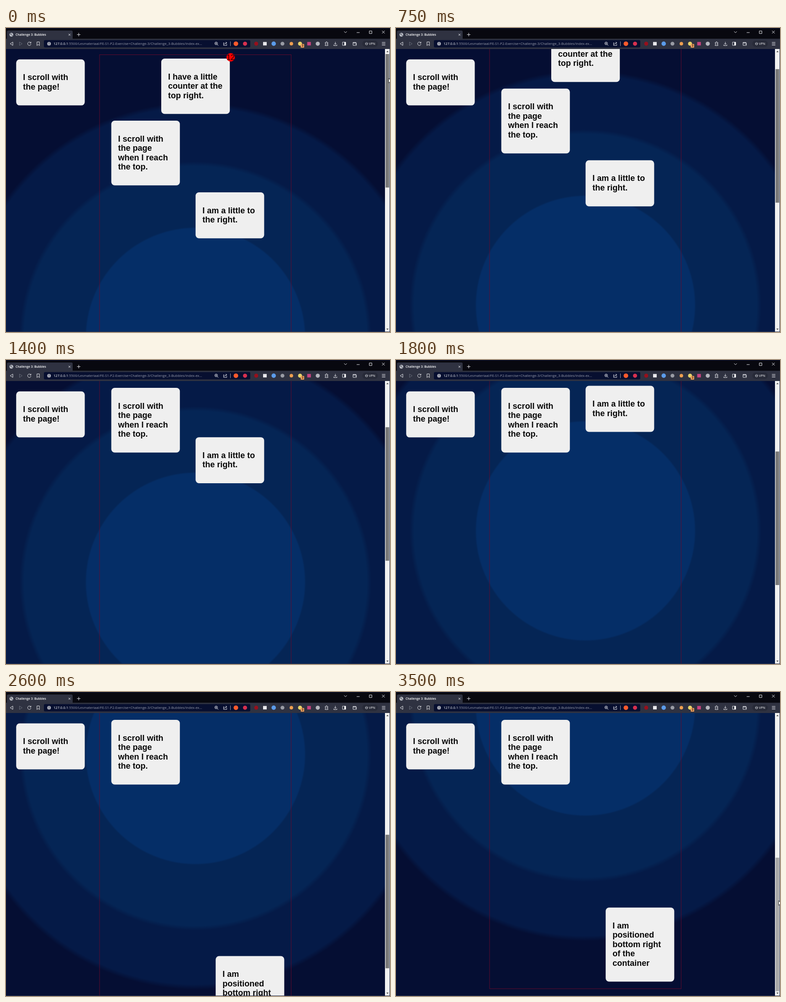
An HTML page that plays this animation: 841 by 666 pixels, repeating every 3.7 s.

```html
<!DOCTYPE html>
<html lang="en">
<head>
<meta charset="utf-8">
<title>Challenge 3: Bubbles</title>
<style>
  html, body { margin: 0; width: 100%; height: 100%; overflow: hidden; background: #050e33; }
  svg { display: block; width: 841px; height: 666px; }
  .card rect { fill: #efefef; }
  .card text { font: bold 18px "Liberation Sans", Arial, sans-serif; fill: #080808; }
  .badge { font: 16px "Liberation Sans", Arial, sans-serif; fill: #1c0000; text-anchor: middle; }
  .ui { font-family: "Open Sans", "Noto Sans", sans-serif; fill: #fff; }
  .line { fill: none; stroke: #e4e5ea; stroke-width: 1; }
</style>
</head>
<body>
<svg viewBox="0 0 841 666" xmlns="http://www.w3.org/2000/svg">
  <defs>
    <clipPath id="view"><rect y="46" width="830" height="619"/></clipPath>
    <radialGradient id="rings" gradientUnits="userSpaceOnUse" cx="415" cy="677.7" r="520">
      <stop offset=".458" stop-color="#052e67"/>
      <stop offset=".465" stop-color="#052555"/>
      <stop offset=".721" stop-color="#052555"/>
      <stop offset=".741" stop-color="#051a47"/>
      <stop offset=".968" stop-color="#051a47"/>
      <stop offset=".990" stop-color="#050e33"/>
    </radialGradient>
  </defs>

  <g clip-path="url(#view)">
    <g id="page">
      <rect y="46" width="830" height="1268" fill="url(#rings)"/>
      <rect x="204.9" y="58.5" width="419.7" height="1238.5" fill="none" stroke="#6a0a2c" stroke-width=".9"/>
    </g>
    <g id="sticky"></g>
    <g id="fixed"></g>
  </g>

  <!-- scrollbar -->
  <rect x="830" y="46" width="11" height="620" fill="#f1f1f1"/>
  <path d="M833 53l2.5-3 2.5 3zM833 658.5l2.5 3 2.5-3z" fill="#505050"/>
  <rect id="thumb" x="831.2" y="57" width="8" height="292.5"/>
  <path d="M840.5 46V666M0 665.5H841" stroke="#2b3350"/>

  <!-- browser frame -->
  <g class="ui">
    <rect width="841" height="25" fill="#08080f"/>
    <rect width="841" height="1" fill="#0b1236"/>
    <path d="M2 25V8.500q0-3 3-3H143q3 0 3 3V25z" fill="#2f3241"/>
    <rect y="23.500" width="841" height="22.500" fill="#2f3241"/>
    <rect x="83" y="26.500" width="452" height="16" rx="2.500" fill="#070f30"/>
    <circle cx="11.800" cy="14.700" r="4.200" fill="#b9bcc4"/>
    <path d="M9 13q2-2 3 0t-1 2zM12 17q1-2 3-1.500l-1 2z" fill="#4a4d5a"/>
    <text x="21" y="17" font-size="6.700" font-weight="600">Challenge 3: Bubbles</text>
    <text x="104" y="37.200" font-size="7.600">127.0.0.1<tspan fill="#989cab">:5500/Lesmateriaal/FE-S1-P2-Exercise+Challenge-3/Challenge_3-Bubbles/index-ex...</tspan></text>
    <g class="line">
      <path d="M137 12.700l4 4m0-4l-4 4M155.500 14.500h7.500m-3.750-3.750v7.500"/>
      <path d="M740.500 7.500l3 3 3-3M768 10h6.500M795.700 6.500h5.600v5.600h-5.600zM823.500 6l6 6m0-6l-6 6"/>
      <path d="M15 30.800v7.400l-6-3.700z"/>
      <path d="M29.500 30.800v7.400l6-3.700z" stroke="#666a78"/>
      <path d="M54 32.200a3.700 3.700 0 1 0 .7 3M54.700 30.300v2.700h-2.700"/>
      <path d="M67.800 30.500h5.400v8l-2.700-2.500-2.700 2.500z"/>
      <circle cx="460.300" cy="33.700" r="3"/>
      <path d="M462.500 36l2.500 2.500M458.800 33.700h3m-1.500-1.500v3"/>
      <path d="M478 32.500h-1.500v5.500h7v-2.500M478.500 36q.5-3.500 5-3.500m-2-2l2.300 2-2.300 2"/>
      <path d="M491.500 29.500v10" stroke="#9a9dac"/>
      <path d="M699 32h2q-.5-2 1-2t1 2h2v2q-2-.3-2 1t2 1v2.500h-6v-2q1.700 0 1.700-1.300T699 34z"/>
      <path d="M721.300 30.500v5.500m-2.300-2.200l2.300 2.300 2.300-2.300M717.800 36.500v2h7v-2"/>
      <path d="M737 31h7v7h-7z"/>
      <path d="M760 31.500h6.500v1.500h1v5h-7.500zM760 33h6.500M765 35.500h2"/>
      <path d="M823.300 31.500h7.500m-7.500 3h7.500m-7.500 3h7.500"/>
    </g>
    <rect x="741" y="31" width="3" height="7"/>
    <circle cx="94.300" cy="34.500" r="4" fill="#a9acb8"/>
    <path d="M94.300 32v3m0 1v1" stroke="#2a2d3c"/>
    <g id="addons"></g>
    <rect x="645.500" y="35" width="7.500" height="8" rx="1" fill="#f3a15c"/>
    <text x="649.300" y="41.400" font-size="6.500" font-weight="600" text-anchor="middle" style="fill:#111">3</text>
    <rect x="780.500" y="27.500" width="34" height="14" rx="7" fill="#272a38"/>
    <circle cx="789.700" cy="34.500" r="2.700" fill="none" stroke="#d5d7de" stroke-width=".8"/>
    <path d="M787 34.500h5.400" stroke="#d5d7de" stroke-width=".8"/>
    <text x="795" y="37" font-size="7">VPN</text>
  </g>

  <path id="cursor" d="M0 0v10.500l2.400-2.200 1.700 3.800 1.700-.8-1.700-3.600h3.300z" fill="#fff" stroke="#000" stroke-width=".8"/>
</svg>

<script>
const NS = "http://www.w3.org/2000/svg";
const $ = id => document.getElementById(id);

function add(parent, tag, attrs, text) {
  const el = document.createElementNS(NS, tag);
  for (const k in attrs) el.setAttribute(k, attrs[k]);
  if (text) el.textContent = text;
  return parent.appendChild(el);
}

function card(parent, x, y, lines) {
  const g = add(parent, "g", { class: "card", transform: `translate(${x} ${y})` });
  add(g, "rect", { width: 150.2, height: 59.8 + 20.5 * lines.length, rx: 7.5 });
  lines.forEach((s, i) => add(g, "text", { x: 15, y: 45.6 + 20.5 * i }, s));
}

card($("page"), 340, 67, ["I have a little", "counter at the", "top right."]);
card($("page"), 415.2, 360, ["I am a little to", "the right."]);
card($("page"), 459.2, 1119.2, ["I am", "positioned", "bottom right", "of the", "container"]);
add($("page"), "circle", { cx: 492, cy: 64.3, r: 9.2, fill: "#f00" });
add($("page"), "text", { class: "badge", x: 492, y: 70 }, "12");
card($("sticky"), 230.6, 203, ["I scroll with", "the page", "when I reach", "the top."]);
card($("fixed"), 22.3, 68.8, ["I scroll with", "the page!"]);

// toolbar add-ons: centre x, radius, colour
[[503.5, 5, "#fb5a2c"], [523.5, 4.5, "#d8304f"], [548, 4.3, "#96101c"], [586.3, 4.8, "#5b9bea"],
 [605.5, 4.2, "#9a9ca5"], [625, 3.8, "#f0a050"], [644, 4.4, "#e8d36a"], [682.8, 4.5, "#b4b6bd"]]
  .forEach(([cx, r, fill]) => add($("addons"), "circle", { cx, cy: 34.4, r, fill }));
[[567, "#e8e8ec"], [663.7, "#c8437f"]]
  .forEach(([x, fill]) => add($("addons"), "rect", { x: x - 4, y: 30.6, width: 8, height: 7.6, fill }));

// scroll path: time in ms, offset in px
const LOOP = 3700, STEP = 50, END = 647;
const path = [[50, 0], [400, 33], [1050, 111], [1800, 303.4], [2300, 439.5], [2900, 616.2], [3350, END]];
const slope = path.slice(1).map((p, i) => (p[1] - path[i][1]) / (p[0] - path[i][0]));
const tangent = path.map((_, i) => {
  const a = slope[i - 1], b = slope[i];
  return a && b ? 2 * a * b / (a + b) : (a || b) / 2;
});

function scrollAt(t) {
  if (t <= path[0][0]) return 0;
  const i = path.findIndex(p => p[0] >= t) - 1;
  if (i < 0) return END;
  const [t0, y0] = path[i], [t1, y1] = path[i + 1];
  const h = t1 - t0, u = (t - t0) / h, v = 1 - u;
  return y0 * (1 + 2 * u) * v * v + y1 * u * u * (3 - 2 * u)
    + h * u * v * (tangent[i] * v - tangent[i + 1] * u);
}

const shift = (id, x, y) => $(id).setAttribute("transform", `translate(${x} ${y})`);

function draw(now) {
  const t = Math.floor((now % LOOP) / STEP) * STEP;
  const s = scrollAt(t);
  shift("page", 0, -s);
  shift("sticky", 0, Math.max(-142, -s));
  shift("thumb", 0, s * 306 / END);
  $("thumb").setAttribute("fill", t >= 3500 ? "#a8a8a8" : "#787878");
  $("cursor").setAttribute("visibility", t < 100 || t >= 3350 ? "visible" : "hidden");
  shift("cursor", 838, t < 100 ? 110 : 457);
}

const start = performance.now();
function tick() {
  draw(performance.now() - start);
  requestAnimationFrame(tick);
}
tick();
</script>
</body>
</html>
```
